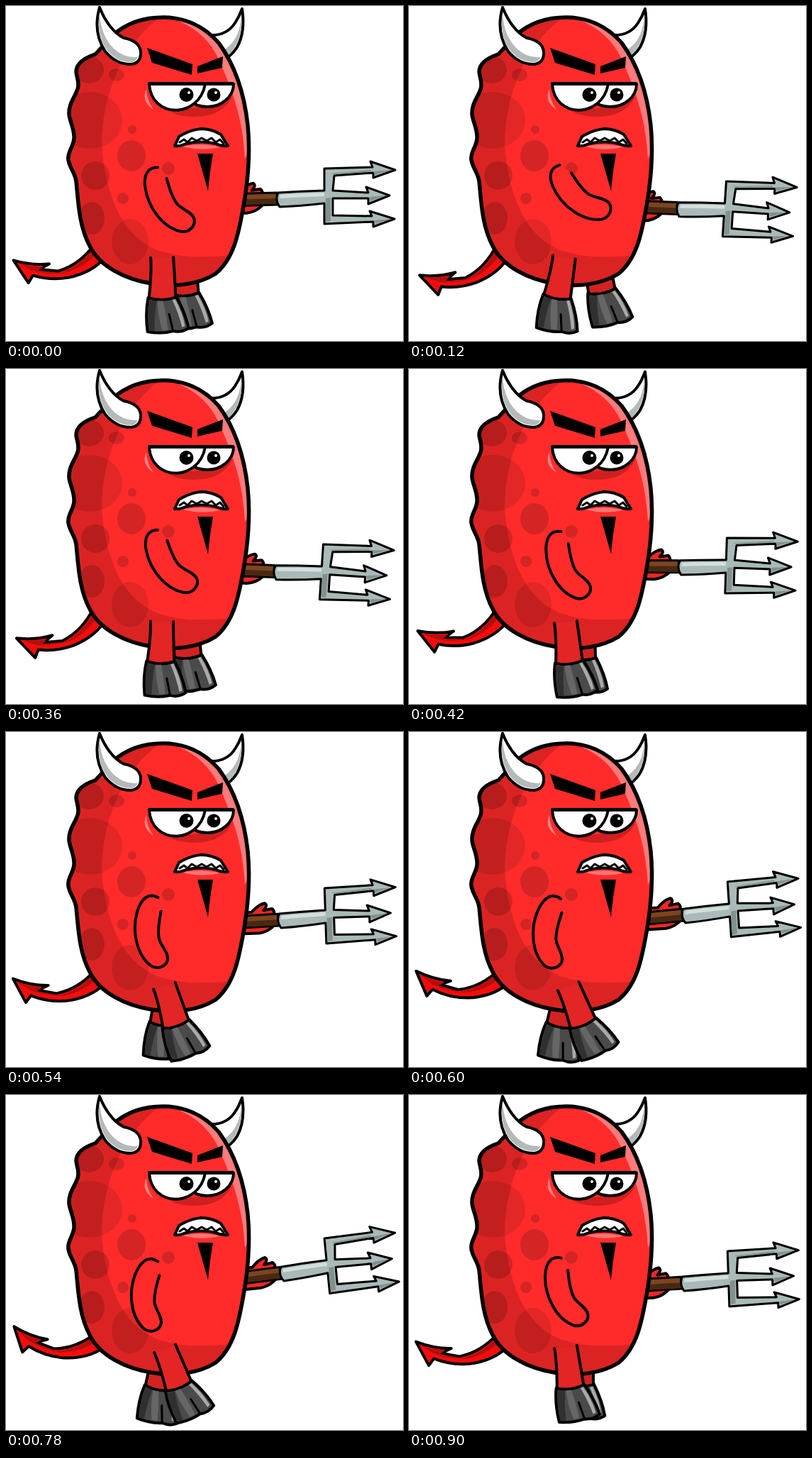
An HTML page that plays this animation: 560 by 472 pixels, repeating every 0.96 s.

```html
<!DOCTYPE html>
<html lang="en">
<head>
<meta charset="utf-8">
<title>Walking devil</title>
<style>
html, body { margin: 0; width: 100%; height: 100%; overflow: hidden; background: #fff; }
svg { display: block; width: 560px; height: 472px; }
.ink { stroke: #000; stroke-width: 4; stroke-linejoin: round; stroke-linecap: round; }
.line { fill: none; }
.thin { stroke-width: 3; }
.bold { stroke-width: 5.5; }
</style>
</head>
<body>
<svg viewBox="0 0 560 472">
  <defs>
    <path id="shape" d="M126 68C111 73 99 81 99 93C100 102 104 108 101 117C97 129 88 138 89 153C90 163 97 174 96 187C95 199 86 206 88 217C90 229 97 234 99 247C102 277 103 310 118 338C132 367 168 385 205 391C238 397 272 392 296 377C321 356 328 322 335 282C341 248 345 208 341 168C336 122 322 82 300 52C278 27 250 16 222 16C194 16 170 24 151 41Z"/>
    <clipPath id="inside"><use href="#shape"/></clipPath>
    <g id="hoof">
      <path class="ink" fill="#4a4a4a" d="M199 408Q218 415 239 408Q251 431 255 452Q245 459 233 456Q217 460 197 456Q194 430 199 408Z"/>
      <path fill="#303030" d="M200 412L211 413Q207 435 207 455L199 454Q197 432 200 412Z"/>
      <path fill="#666" d="M212 413L220 413L224 436L226 454L218 455Q212 435 212 413Z"/>
      <path fill="#aaa" d="M233 412L237 411Q247 430 250 449L246 451Q241 430 233 412Z"/>
      <path class="ink line thin" d="M228 432L233 456"/>
    </g>
  </defs>

  <g id="tail">
    <path class="ink" fill="#f50c0c" d="M126 335Q103 363 72 370L46 366L60 359Q35 360 10 351L29 384L36 374Q60 383 86 380Q120 375 140 354Z"/>
    <path fill="#b30f0f" d="M126 339Q104 366 73 373L43 368L52 362Q34 362 17 356L35 367Q60 375 82 373Q110 367 130 346Z"/>
  </g>

  <g id="far">
    <path fill="#d32222" d="M202 350H237V410H201Z"/>
    <path class="ink line" d="M202 350L200 409M237 350L238 409"/>
    <use href="#hoof"/>
  </g>

  <path class="ink" fill="#fff" d="M288 41Q311 42 323 24Q329 15 333 4Q338 36 326 58Q318 71 304 77Z"/>
  <path fill="#b4bab9" d="M332 14Q330 42 315 56L303 66L306 74Q318 68 324 56Q334 39 332 14Z"/>

  <g id="fork">
    <path id="hand" class="ink" fill="#f02626" d="M300 262L328 262Q339 251 347 250Q352 253 345 260L357 258Q363 263 357 269L360 281Q352 290 338 292L300 292Z"/>
    <path class="ink thin" fill="#7a4520" d="M310 265L382 263L383 280L310 282Z"/>
    <path fill="#492812" d="M310 273L382 271V279L310 280Z"/>
    <path class="ink thin" fill="#a9bab8" d="M384 263Q415 261 449 260L449 229L517 227L514 219L549 231L518 242L518 235L463 239L461 260L511 263L508 255L541 267L511 279L511 271L461 271L461 295L516 296L513 289L548 300L518 311L518 304L449 307L449 278Q415 282 386 283Q379 273 384 263Z"/>
    <path fill="#d4dfdd" d="M387 266Q415 264 449 263V268Q416 269 386 271Z"/>
    <path fill="#82918f" d="M451 271L458 270V303L451 304ZM458 236L515 231V233L463 237ZM518 233L543 231L520 238ZM513 269L536 267L514 275ZM520 302L543 300L521 307Z"/>
  </g>

  <use href="#shape" fill="#dc2323"/>
  <g clip-path="url(#inside)">
    <path fill="#ff2b2b" d="M224 12C170 45 135 120 135 195C140 270 166 322 207 341C240 356 280 355 330 350L380 200L300 0Z"/>
    <g id="spots"></g>
    <path fill="#ff7a7a" d="M222 14C262 24 289 46 304 84C321 124 334 160 337 215L350 190L330 70L280 10Z"/>
  </g>
  <use href="#shape" class="ink line bold"/>

  <path class="ink" fill="#fff" d="M132 2Q145 34 166 45Q188 49 190 64Q191 80 177 82Q156 83 140 64Q122 37 132 2Z"/>
  <path fill="#b4bab9" d="M132 11Q134 42 152 60Q167 74 186 72Q182 80 175 79Q157 79 143 63Q127 41 132 11Z"/>

  <path d="M199 59L263 82L262 97L206 80ZM270 85L306 71L305 87L270 95Z"/>
  <path fill="#d01f1f" d="M218 139Q236 157 266 156Q305 156 319 128L300 139L264 144L230 146Z"/>
  <path fill="#ff8080" d="M198 117Q190 134 208 146Q198 132 198 117Z"/>
  <g fill="#fff">
    <path class="ink" d="M247 110A37 32 0 0 0 321 110Z"/>
    <path class="ink" d="M202 110C205 159 272 159 281 110Z"/>
  </g>
  <path class="ink line" d="M202 109H320"/>
  <circle cx="254.500" cy="125" r="10"/><circle cx="293" cy="125" r="9.500"/>
  <g fill="#fff"><circle cx="258" cy="122" r="2"/><circle cx="296" cy="122" r="2"/></g>

  <path fill="#ff7474" d="M249 198Q276 192 302 199Q276 205 249 198Z"/>
  <path class="ink" fill="#fff" d="M238 197L244 184Q258 175 275 173Q290 173 303 181L313 197Q304 198 296 194Q276 189 254 194Q245 198 238 197Z"/>
  <path class="ink line thin" d="M245 192L251 188L256 192L262 186L269 190L276 186L283 190L290 186L296 192L302 188L307 194"/>
  <path d="M270 208H292Q287 236 285 261Q278 236 270 208Z"/>

  <g id="near">
    <path fill="#e32525" d="M205 353H236L238 410H199Z"/>
    <path class="ink line" d="M204 352Q205 372 200 409M236 352L238 409"/>
    <use href="#hoof"/>
  </g>

  <g id="arm">
    <path fill="#ff2b2b" d="M214 227C199 227 195 239 197 254C202 285 226 312 251 316C263 317 271 306 268 297C264 287 250 285 243 277C231 263 229 249 222 235Z"/>
    <path class="ink line" d="M214 227C199 227 195 239 197 254C202 285 226 312 251 316C263 317 271 306 268 297C264 287 250 285 243 277C234 266 231 253 227 242"/>
  </g>
</svg>
<script>
const $ = id => document.getElementById(id);

// Big spots are paler than small ones
const spot = (x, y, rx, ry = rx) =>
  `<ellipse cx="${x}" cy="${y}" rx="${rx}" ry="${ry}" fill-opacity="${rx > 25 ? 0.11 : 0.17}"/>`;
$("spots").innerHTML =
  spot(118, 161, 46, 40) + spot(117, 90, 21, 19) + spot(156, 97, 11, 9) + spot(178, 174, 6) +
  spot(177, 211, 20, 22) + spot(126, 239, 20) + spot(121, 299, 18, 23) + spot(165, 271, 8) +
  spot(175, 332, 26, 32) + spot(229, 229, 9);

const STEP = 60, HALF = 8, LEAD = 4;
const easeOut = u => 1 - (1 - u) ** 1.4;
const put = (id, value) => $(id).setAttribute("transform", value);

// The walk swings from pose a to pose b in one half of the loop and back in the other
function draw(ms) {
  const step = (Math.floor(ms / STEP) + 2 * HALF - LEAD) % (2 * HALF);
  const back = step >= HALF;
  const u = step % HALF / HALF;
  const swing = back ? 1 - easeOut(u) : easeOut(u);
  const even = back ? 1 - u : u;
  const lift = back ? (1 - u) ** 4 : u;
  const mix = (a, b, k = swing) => a + (b - a) * k;

  put("fork", `rotate(${mix(7.5, -7.5, even)} 174 215)`);
  put("hand", `translate(${27 * lift} ${-4 * lift})`);
  put("tail", `rotate(${mix(-24, 17, even)} 130 345)`);
  put("arm", `rotate(${mix(-25, 47)} 202 231)`);
  put("near", `rotate(${mix(15.5, -29)} 219.5 347) translate(0 ${mix(2, 9, lift)})`);
  put("far", `translate(${mix(284, 201)} ${mix(400, 416)}) rotate(${mix(-15, 16)}) translate(-219 -409)`);
}

const start = performance.now();
function tick() {
  draw(performance.now() - start);
  requestAnimationFrame(tick);
}
tick();
</script>
</body>
</html>
```
